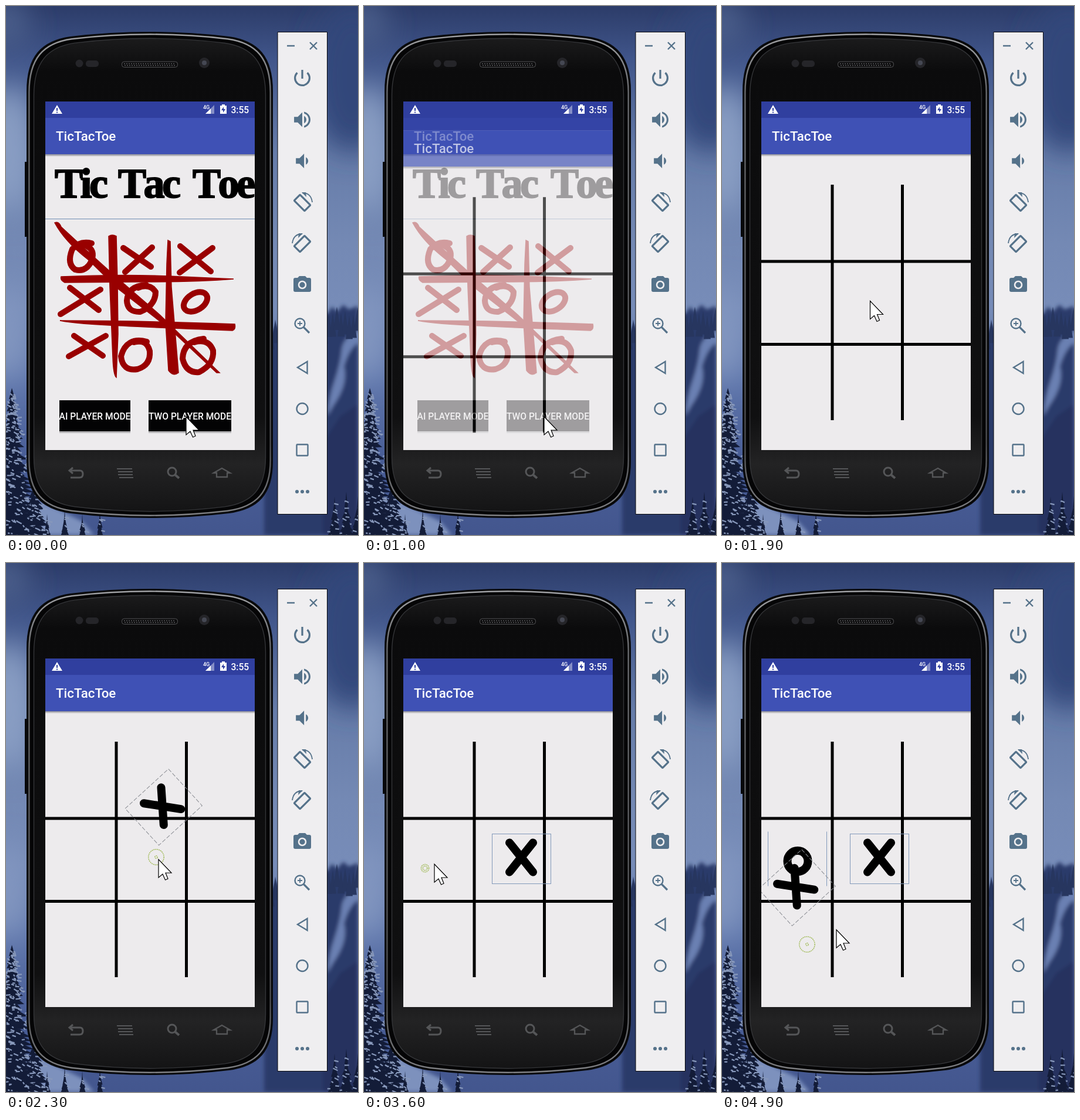
An HTML page for the animation above (5000 ms loop, 600 by 903 pixels).

```html
<!DOCTYPE html>
<html lang="en">
<head>
<meta charset="utf-8">
<title>TicTacToe</title>
<style>
html, body { margin: 0; width: 100%; height: 100%; overflow: hidden; background: #34477a }
svg { display: block; width: 100vw; height: 100vh }
text { font-family: Roboto, Arial, sans-serif; font-weight: 500; fill: #fff }
.logo text { font: bold 72px "Liberation Serif", Times, serif; font-kerning: none; letter-spacing: -4.5px; fill: #000; stroke: #000; stroke-width: 2 }
.line { fill: none; stroke: #55728a; stroke-width: 2.4 }
.thin { stroke-width: 1.8 }
.thick { stroke-width: 3.2 }
.nav { fill: none; stroke: #555658; stroke-width: 3 }
.red { fill: #900; stroke: #900; stroke-width: 1.5 }
.ink { fill: none; stroke: #900; stroke-width: 10; stroke-linecap: round; stroke-linejoin: round }
.mark { fill: none; stroke: #000; stroke-width: 14; stroke-linecap: round }
.box { fill: none; stroke: #8299ba; stroke-width: 1 }
.spin .box { stroke: #8b8e94; stroke-dasharray: 7 3 }
.ring { fill: none; stroke: #a5bd60; stroke-width: 1.5; stroke-dasharray: 2 1 }
</style>
</head>
<body>
<svg viewBox="0 0 600 903" preserveAspectRatio="none">
<defs>
  <linearGradient id="sky" x2="0" y2="1">
    <stop offset="0" stop-color="#2c3c69"/><stop offset=".1" stop-color="#40558a"/>
    <stop offset=".28" stop-color="#667ca9"/><stop offset=".45" stop-color="#7489b4"/>
    <stop offset=".57" stop-color="#778cb8"/><stop offset=".7" stop-color="#6077ac"/>
    <stop offset=".85" stop-color="#4a5f98"/><stop offset="1" stop-color="#43568e"/>
  </linearGradient>
  <linearGradient id="face" x2="0" y2="1">
    <stop offset="0" stop-color="#1b1b1c"/><stop offset=".07" stop-color="#0b0b0c"/>
    <stop offset=".8" stop-color="#101011"/><stop offset=".9" stop-color="#232324"/><stop offset="1" stop-color="#141415"/>
  </linearGradient>
  <linearGradient id="rim" x2="0" y2="1">
    <stop offset="0" stop-color="#a0a1a4"/><stop offset=".12" stop-color="#66686b"/>
    <stop offset=".85" stop-color="#4a4b4e"/><stop offset="1" stop-color="#808184"/>
  </linearGradient>
  <linearGradient id="shade" x2="0" y2="1">
    <stop offset="0" stop-color="#8b8b92"/><stop offset="1" stop-color="#edebed"/>
  </linearGradient>
  <filter id="soft" x="-50%" y="-50%" width="200%" height="200%"><feGaussianBlur stdDeviation="25"/></filter>
  <filter id="haze"><feGaussianBlur stdDeviation="3"/></filter>
  <clipPath id="screen"><path d="M67 163H424V758H67Z"/></clipPath>
  <clipPath id="content"><path d="M67 253H424V758H67Z"/></clipPath>
  <path id="shell" d="M36 145C36 87 60 60 110 53Q245 37 380 53C430 60 454 87 454 145V778C454 833 430 858 380 865Q245 881 110 865C60 858 36 833 36 778Z"/>
  <g id="bar">
    <path fill="#303f9f" d="M67 163H424V191H67Z"/>
    <path fill="#3f51b5" d="M67 191H424V253H67Z"/>
    <path fill="url(#shade)" d="M67 253H424V257H67Z"/>
    <text x="85" y="230" font-size="22.3">TicTacToe</text>
  </g>
  <g id="turn">
    <rect class="line thick" x="-7" y="-12.500" width="14" height="25" rx="1" transform="translate(0 1) rotate(-45)"/>
    <path class="line thin" d="M0 -16Q15 -16 17 0"/><path fill="#55728a" d="M-1 -17H6L7 -9Z"/>
  </g>
</defs>

<rect width="600" height="903" fill="url(#sky)"/>
<g filter="url(#soft)">
  <ellipse cx="5" cy="245" rx="45" ry="110" fill="#8a9fc4"/>
  <ellipse cx="0" cy="30" rx="40" ry="45" fill="#4b5e8b"/>
  <ellipse cx="590" cy="120" rx="70" ry="130" fill="#33477a"/>
  <ellipse cx="0" cy="560" rx="40" ry="80" fill="#8296c0"/>
</g>
<g filter="url(#haze)">
  <path fill="#2b3b6b" d="M440 570L462 545 500 525 548 525 556 513 564 522 575 510 584 518 600 512V903H440Z"/>
  <path fill="#6a80b2" d="M600 555Q574 566 572 588T560 640Q550 668 548 700L558 682Q584 645 576 615 585 585 600 575Z"/>
  <path fill="#26335f" d="M540 745L570 700 600 680V903H540Z"/>
  <path fill="#7d91bd" d="M0 830L70 850 130 880 150 903H0Z"/>
</g>
<g id="woods"></g>

<path fill="#060607" d="M32 266H40V394H32ZM450 195H455V263H450Z"/>
<use href="#shell" fill="#050506" stroke="#090a0c" stroke-width="2"/>
<use href="#shell" fill="none" stroke="url(#rim)" stroke-width="2.500" transform="translate(245 459) scale(.984 .992) translate(-245 -459)"/>
<use href="#shell" fill="url(#face)" stroke="#343538" stroke-width="1.500" transform="translate(245 459) scale(.945 .975) translate(-245 -459)"/>
<g fill="#252529">
  <circle cx="125" cy="98" r="6.5"/><rect x="136" y="93" width="22" height="11" rx="5"/>
  <circle cx="338" cy="97" r="9"/><circle cx="338" cy="97" r="4" fill="#454853"/>
</g>
<rect x="197.500" y="95" width="95" height="9.500" rx="4" fill="#0c0c0d" stroke="#535355"/>
<path d="M201 98.500H289M202 101.500H289" stroke="#5a5a5c" stroke-width="1.500" stroke-dasharray="2 2"/>
<g class="nav">
  <path d="M109 793H126Q131 793 131 799T125 805H110M114 788L108 793 114 798"/>
  <path d="M189 790H215M191 795H216M191 800H216M193 805H217" stroke-width="2"/>
  <circle cx="283" cy="795" r="7"/><path d="M288 800L295 806" stroke-width="4"/>
  <path d="M354 797L368 789 382 797H377V804H359V797Z" stroke-width="2.300"/>
</g>

<g clip-path="url(#screen)">
  <path fill="#edebed" d="M67 163H424V758H67Z"/>
  <g id="menu">
    <use href="#bar"/>
    <path d="M67 255.500H424" stroke="#b3b5bd"/>
    <path d="M67 363.500H424" stroke="#6e8db3"/>
    <g class="logo"><text x="83" y="327">Tic</text><text x="191" y="327">Tac</text><text x="318" y="327">Toe</text></g>
    <g class="red">
      <path d="M83 370Q90 367 94 377 140 420 186 461L262 527 364 626H359L280 552 190 482 140 433Q100 402 83 370Z"/>
      <path d="M175 393Q181 389 188 393L190 470 191 560 188 634Q183 630 182 600L177 480Z"/>
      <path d="M276 400L280 402 282 480 294 626Q285 633 277 622L272 540 274 440Z"/>
      <path d="M94 462Q200 457 300 462L388 466Q330 471 230 471L100 472Q92 468 94 462Z"/>
      <path d="M92 537Q230 537 390 543 392 552 386 554 250 549 200 546 120 543 92 537Z"/>
    </g>
    <g class="ink">
      <path d="M146 405Q126 400 113 415 103 440 118 450 136 455 146 435 152 417 138 410 128 404 122 412"/>
      <path d="M239 476Q208 478 206 503 207 523 229 522 255 511 255 488 245 473 225 481"/>
      <ellipse cx="323" cy="505" rx="22" ry="14" transform="rotate(-32 323 505)"/>
      <path d="M240 573Q205 564 196 598 199 624 224 620 247 613 245 589 240 568 218 574"/>
      <path d="M337 568Q302 572 301 602 307 627 329 625 355 612 353 588 345 567 321 574"/>
      <path d="M200 413L247 445M249 412L203 454M297 410L349 453M352 413L296 455"/>
      <path d="M109 481L158 519M161 484L93 526M116 563L165 597M170 563L107 598"/>
    </g>
    <path fill="#b9b8ba" d="M91 726H212V729H91ZM243 726H384V729H243Z"/>
    <path fill="#030304" d="M91 673H212V726H91ZM243 673H384V726H243Z"/>
    <g font-size="15.600" text-anchor="middle">
      <text x="151.500" y="706">AI PLAYER MODE</text><text x="313.500" y="706">TWO PLAYER MODE</text>
    </g>
  </g>
  <g id="game">
    <path fill="#edebed" d="M67 191H424V758H67Z"/>
    <use href="#bar"/>
    <path d="M188 305V707M307.500 305V707M67 436H424M67 577.500H424" stroke="#000" stroke-width="5"/>
  </g>
  <path fill="#303f9f" d="M67 163H424V191H67Z"/>
  <path fill="#fff" d="M87 169L96 184H78Z"/>
  <path stroke="#303f9f" stroke-width="2" d="M87 174V179M87 180.500V182.500"/>
  <text x="336" y="176" font-size="9" font-weight="700">4G</text>
  <path fill="#858ec6" d="M355 169V184H340Z"/><path fill="#fff" d="M349 175V184H340Z"/>
  <path fill="#fff" d="M368 168H373V170H376V184H365V170H368Z"/>
  <path fill="#303f9f" d="M371 172L367 178H370V182L374 176H371Z"/>
  <text x="383.500" y="183" font-size="15.600">3:55</text>
</g>
<g id="marks" clip-path="url(#content)">
  <g><rect class="box" x="-49.500" y="-42" width="100" height="85"/><path class="mark" d="M-20 -27L20 23M20 -27L-20 23"/></g>
  <g><path class="box" d="M-49.500 -46V47M50.500 -46V47"/><ellipse class="mark" cx="1" cy="4.500" rx="17.500" ry="18"/></g>
  <g><rect class="box" x="-49.500" y="-42" width="100" height="85"/><path class="mark" d="M-20 -27L20 23M20 -27L-20 23"/></g>
</g>

<path fill="#efeef0" stroke="#08090d" d="M463 44.500H547.500V867.500H463Z"/>
<g fill="#55728a">
  <path class="line" d="M479 68H492M518 62L530 74M530 62L518 74"/>
  <path class="line thick" d="M505 109V124M496.500 114A12.400 12.400 0 1 0 513.500 114"/>
  <path transform="translate(486.400 175.400) scale(1.550)" d="M3 9v6h4l5 5V4L7 9H3zm13.500 3c0-1.770-1.020-3.290-2.500-4.030v8.050c1.480-.73 2.500-2.250 2.500-4.020zM14 3.230v2.060c2.890.86 5 3.540 5 6.710s-2.110 5.850-5 6.710v2.060c4.010-.91 7-4.490 7-8.770s-2.990-7.860-7-8.770z"/>
  <path transform="translate(486.400 245.900) scale(1.550)" d="M18.500 12c0-1.770-1.020-3.290-2.500-4.030v8.050c1.480-.73 2.500-2.250 2.500-4.020zM5 9v6h4l5 5V4L9 9H5z"/>
  <use href="#turn" x="505" y="335"/>
  <use href="#turn" transform="translate(505 405) scale(-1 1)"/>
  <path d="M500 461H510L513 464H517Q520 464 520 467V485Q520 488 517 488H493Q490 488 490 485V467Q490 464 493 464H497Z"/>
  <circle cx="505" cy="476" r="6" stroke="#efeef0" stroke-width="2.600"/>
  <g class="line">
    <circle cx="501" cy="542" r="8.500"/><path class="thick" d="M507 548L517 558"/><path class="thin" d="M497 542H505M501 538V546"/>
    <path d="M513.500 607V627L497 617Z"/><circle cx="505" cy="687.500" r="9.500"/><rect x="495.500" y="748.500" width="19" height="19" rx="1"/>
  </g>
  <circle cx="496" cy="829" r="3"/><circle cx="505" cy="829" r="3"/><circle cx="514" cy="829" r="3"/>
</g>
<g id="ring" class="ring"><circle/><circle/></g>
<path id="cursor" fill="#fff" stroke="#000" stroke-width="1.200" d="M0 0V31L7 25 11.500 35 16 33 12 23H22Z"/>
</svg>
<script>
const el = id => document.getElementById(id);
const clamp = x => Math.min(1, Math.max(0, x));

// Snowy fir trees along the lower edge
let seed = 7;
const rand = () => (seed = seed * 16807 % 2147483647) / 2147483647;
function tree(x, top, base, width, flakes) {
  let dark = '', snow = '';
  for (let y = top; y < base; y += 7) {
    const w = width * (.1 + (y - top) / (base - top)) * (.7 + rand() * .5);
    dark += `M${x} ${y - 8}L${x + w} ${y + 9}L${x - w} ${y + 11}Z`;
    for (let i = 0; i < flakes; i++) snow += `M${x + (rand() * 2 - 1) * w} ${y + rand() * 10}l${2 + rand() * 6} ${rand() * 5 - 1}`;
  }
  return `<path fill="#131c38" d="${dark}"/><path stroke="#8798bb" stroke-width="2.2" d="${snow}"/>`;
}
let woods = '';
for (let x = 445; x < 605; x += 7) {
  const y = 530 + rand() * 18 - (x > 545 ? 18 : 0);
  woods += `<path fill="#27365f" d="M${x} ${y}l6 40h-12Z"/>`;
}
for (let x = 70; x < 190; x += 30) woods += tree(x, 865 + rand() * 20, 910, 10, 1);
for (let x = 560; x < 610; x += 20) woods += tree(x, 810 + rand() * 40, 910, 14, 1);
woods += tree(48, 815, 910, 30, 3) + tree(10, 660, 910, 46, 6);
el('woods').innerHTML = woods;

// time, x, y of the pointer
const path = [[0, 307, 701], [1000, 307, 701], [1400, 209, 522], [2000, 256, 502], [2100, 256, 502],
  [2300, 260, 506], [2700, 260, 506], [3500, 104, 521], [3600, 120, 514], [4300, 155, 641],
  [4600, 145, 651], [4700, 145, 651], [4900, 195, 626]];
const drops = [
  { start: 2067, x: 268, y: 504.5, tap: [256, 502] },
  { start: 3567, x: 128, y: 504.5, tap: [104, 521] },
  { start: 4667, x: 127, y: 642, tap: [145, 651] }
];

function pointer(t) {
  const i = Math.max(1, path.findIndex(p => p[0] >= t));
  const [a, b] = [path[i - 1], path[i]];
  const k = clamp((t - a[0]) / (b[0] - a[0])), s = k * k * (3 - 2 * k);
  return [a[1] + (b[1] - a[1]) * s, a[2] + (b[2] - a[2]) * s];
}

function draw(t) {
  const open = clamp((t - 900) / 300);
  el('game').setAttribute('opacity', Math.min(1, open * 2));
  el('game').setAttribute('transform', `translate(0 ${48 * (1 - open) ** 2})`);
  el('cursor').setAttribute('transform', `translate(${pointer(t)})`);

  const ring = el('ring');
  ring.style.display = 'none';
  drops.forEach((d, i) => {
    const mark = el('marks').children[i], age = t - d.start;
    const k = (1 - Math.cos(Math.PI * clamp(age / 300))) / 2;
    mark.style.display = age < 0 ? 'none' : '';
    mark.setAttribute('class', k < 1 ? 'spin' : '');
    mark.setAttribute('transform', `translate(${d.x} ${d.y - 744 * (1 - k)}) rotate(${360 * k})`);
    if (age >= 0 && age < 300) {
      ring.style.display = '';
      ring.setAttribute('transform', `translate(${d.tap})`);
      ring.children[0].setAttribute('r', 5.5 + age * .033);
      ring.children[1].setAttribute('r', 4 - age * .0075);
    }
  });
}

function tick(now) {
  draw(Math.floor(now % 5000 / 100) * 100);
  requestAnimationFrame(tick);
}
draw(0);
requestAnimationFrame(tick);
</script>
</body>
</html>
```
